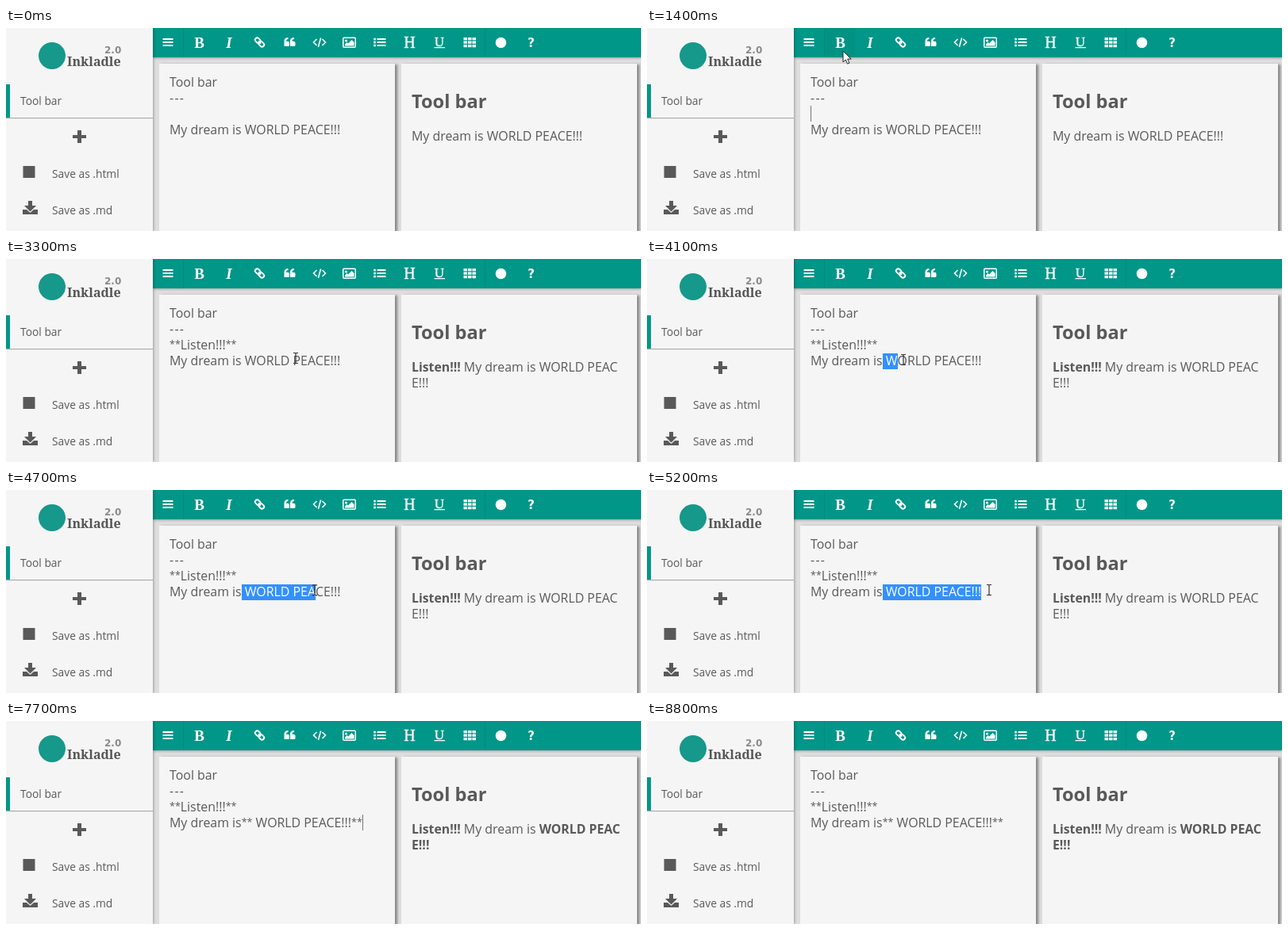
These frames come from a looping animation (800x256 px, 9400 ms). An HTML page:

```html
<!DOCTYPE html>
<html lang="en">
<head>
<meta charset="utf-8">
<title>Markdown editor</title>
<style>
  html, body { margin: 0; width: 100%; height: 100%; overflow: hidden; }
  body { background: #dedede; color: #595959; font: 15.9px/20px "Open Sans", "Noto Sans", sans-serif; }
  #stage { position: relative; width: 800px; height: 256px; overflow: hidden; background: #dedede; }
  #stage > * { position: absolute; }
  svg { left: 0; top: 0; }
  .bar { left: 185px; top: 0; width: 615px; height: 37px; background: #009688; box-shadow: 0 1px 3px rgba(0,0,0,.3); }
  .bar i { position: absolute; top: 0; width: 1px; height: 37px; background: #008a7d; }
  #hover { position: absolute; left: 39px; top: 0; width: 38px; height: 37px; background: #08857a; }
  .side { left: 0; top: 0; width: 185px; height: 256px; background: #f5f5f5; box-shadow: 1px 0 3px rgba(0,0,0,.3); }
  .item { left: 0; top: 71px; width: 180px; height: 42px; border-left: 5px solid #009688; box-shadow: 0 1px 1px rgba(0,0,0,.3); clip-path: inset(0 0 -3px); }
  .panel { top: 45px; width: 297px; height: 230px; background: #f5f5f5; box-shadow: 3px 1px 3px rgba(0,0,0,.4); }
  .small { font-size: 13.8px; white-space: pre; }
  .line { left: 206px; height: 20px; white-space: pre; }
  .line em { font-size: 12.5px; font-style: normal; line-height: 0; vertical-align: 2px; }
  .line u { display: inline-block; height: 20px; margin-top: 1px; line-height: 18px; vertical-align: top; text-decoration: none; background: #3390ff; color: #fff; }
  .line s { display: inline-block; width: 1px; height: 20px; margin-right: -1px; vertical-align: top; background: #777; }
  h2 { left: 511px; top: 77px; margin: 0; font-size: 23.6px; line-height: 30px; font-weight: 700; white-space: pre; }
  #preview { left: 511px; top: 126px; width: 266px; margin: 0; word-break: break-all; }
  #preview b { font-size: 15.8px; font-weight: 700; line-height: 0; }
</style>
</head>
<body>
<div id="stage">
  <div class="bar"><div id="hover"></div><i style="left:38px"></i><i style="left:418px"></i></div>
  <div class="panel" style="left:193px"></div>
  <div class="panel" style="left:498px"></div>
  <div class="side"></div>
  <div class="item"></div>

  <svg width="800" height="256" viewBox="0 0 800 256">
    <circle cx="58" cy="35" r="17" fill="#16988b"/>
    <g font-weight="700">
      <text x="77" y="48" font-family="Noto Serif, serif" font-size="16" font-weight="900" fill="#555">Inkladle</text>
      <text x="124" y="32" font-family="DejaVu Sans, sans-serif" font-size="12" fill="#8a8a8a">2.0</text>
    </g>

    <g fill="#595959">
      <path d="M90 129h5v6h6v4h-6v6h-5v-6h-6v-4h6z"/>
      <rect x="21.5" y="174" width="15" height="15"/>
      <path d="M28 218h5v6h5l-7.500 7.500l-7.500 -7.500h5z"/>
      <path d="M21 229h5l4.500 4l4.500 -4h5v6h-19z"/>
    </g>

    <g fill="#fff">
      <path d="M197.500 13h13v2h-13zM197.500 17h13v2h-13zM197.500 21h13v2h-13z"/>
      <g font-family="Liberation Serif, serif" font-size="19" text-anchor="middle">
        <text x="243.500" y="24.500" font-weight="700">B</text>
        <text x="281" y="24.500" font-weight="700" font-style="italic">I</text>
        <text x="508.500" y="24.500" font-size="20" stroke="#fff" stroke-width=".4">H</text>
        <text x="546" y="22.500" font-size="17" stroke="#fff" stroke-width=".4">U</text>
      </g>
      <path d="M539.500 24h13.500v1.300h-13.500z"/>
      <g transform="translate(319.500 18) rotate(45) scale(.86)" fill="none" stroke="#fff" stroke-width="2.200">
        <rect x="-8" y="-3" width="8.500" height="6" rx="2.800"/>
        <rect x="-.5" y="-3" width="8.500" height="6" rx="2.800"/>
        <path d="M-2.500 0h5"/>
      </g>
      <path id="quote" d="M350.500 23v-6.500q0 -4.500 5 -4.500v2q-2.500 0 -2.500 2.800h2q2 0 2 2v2.700q0 1.500 -1.500 1.500z"/>
      <use href="#quote" x="7.500"/>
      <path d="M391.500 14l-4 4l4 4M398.500 14l4 4l-4 4M396.600 12.500l-3.200 11.500" fill="none" stroke="#fff" stroke-width="1.600"/>
      <rect x="424.750" y="12.250" width="15.500" height="12" rx="1" fill="none" stroke="#fff" stroke-width="1.500"/>
      <circle cx="428.500" cy="16" r="1.600"/>
      <path d="M427 22.500v-2l2.500 -2.500l1.500 1.500l4.500 -4.500l3 3v4.500z"/>
      <path d="M467.500 13h11v2h-11zM467.500 17h11v2h-11zM467.500 21h11v2h-11z"/>
      <path d="M464.500 14h0M464.500 18h0M464.500 22h0" stroke="#fff" stroke-width="3" stroke-linecap="round"/>
      <path d="M576.500 13.700h15.500M576.500 18.200h15.500M576.500 22.700h15.500" stroke="#fff" stroke-width="3.300" stroke-dasharray="4.500 1"/>
      <circle cx="623.500" cy="18.500" r="6.800"/>
      <text x="661.500" y="24" text-anchor="middle" font-family="DejaVu Sans, sans-serif" font-size="15" font-weight="700">?</text>
    </g>
  </svg>

  <div class="small" style="left:18px;top:82px">Tool bar</div>
  <div class="small" style="left:58px;top:174px">Save as .html</div>
  <div class="small" style="left:58px;top:220px">Save as .md</div>

  <div class="line" style="top:58px">Tool bar</div>
  <div class="line" style="top:78px;letter-spacing:1.3px">---</div>
  <div class="line" style="top:98px" id="line3"></div>
  <div class="line" style="top:118px" id="line4"></div>

  <h2>Tool bar</h2>
  <p id="preview"></p>

  <svg width="800" height="256" viewBox="0 0 800 256">
    <path id="arrow" d="M0 0v14l3.300 -3l2.200 5.200l2.400 -1l-2.200 -5.100h4.500z" fill="#fff" stroke="#222" stroke-width="1"/>
    <path id="beam" d="M-3 -6.500h2q1 0 1 1q0 -1 1 -1h2M0 -5.500v11M-3 6.500h2q1 0 1 -1q0 1 1 1h2" fill="none" stroke="#333" stroke-width="1.200"/>
  </svg>
</div>

<script>
const LOOP = 9400, STEP = 100;
const INSERT = 1500, SELECT = 4000, EMBOLDEN = 6300;
const DREAM = "My dream is", PEACE = " WORLD PEACE!!!";
const CARET = [[300, 800], [1300, 2600], [6300, 6900], [7400, 7900], [8300, 8800]];
const POINTER = [[1000, 1600], [3000, 6900]];
const TYPED = [[1500, ""], [1600, "L"], [1700, "Li"], [1800, "List"], [1900, "Liste"], [2000, "Listen"], [2600, "Listen!!!"]];
const HOVER = [[1300, 0], [1400, .25], [1600, 1], [3000, 1], [3300, 0], [6000, 0], [6300, 1], [6900, 1], [7200, 0]];
const PATH = [
  [1000, 330, 225], [1400, 247, 29], [3000, 247, 29], [3300, 365, 125],
  [3900, 297, 127], [4000, 312, 126], [4100, 323, 127], [5000, 422, 126],
  [5200, 431, 126], [5400, 431, 126], [6100, 249, 20]
];

const el = id => document.getElementById(id);
const during = (spans, t) => spans.some(([a, b]) => t >= a && t < b);

// Linear value of one column of a key list at time t
function track(keys, t, col = 1) {
  const next = keys.findIndex(k => k[0] > t);
  if (next < 0) return keys[keys.length - 1][col];
  if (next === 0) return keys[0][col];
  const a = keys[next - 1], b = keys[next];
  return a[col] + (b[col] - a[col]) * (t - a[0]) / (b[0] - a[0]);
}

function setHtml(id, html) {
  const node = el(id);
  if (node.dataset.html !== html) node.innerHTML = node.dataset.html = html;
}

function drawText(t) {
  const caret = during(CARET, t) ? "<s></s>" : "";
  const stars = "<em>**</em>";
  const inserted = t >= INSERT, bold = t >= EMBOLDEN;
  const word = inserted ? TYPED.filter(k => k[0] <= t).pop()[1] : "";
  const here = bold ? "" : caret;
  setHtml("line3", inserted ? stars + word + here + stars : here);

  let tail = PEACE;
  if (bold) {
    tail = stars + PEACE + stars + caret;
  } else if (t >= SELECT) {
    const n = Math.min(PEACE.length, 1 + Math.round((t - SELECT) / 1000 * 13));
    tail = "<u>" + PEACE.slice(0, n) + "</u>" + PEACE.slice(n);
  }
  setHtml("line4", DREAM + tail);

  const lead = !inserted ? "" : word ? `<b>${word}</b> ` : "**** ";
  setHtml("preview", lead + DREAM + (bold ? ` <b>${PEACE.trim()}</b>` : PEACE));
}

function drawPointer(t) {
  const x = track(PATH, t), y = track(PATH, t, 2);
  const shown = during(POINTER, t);
  const inText = x > 193 && x < 490 && y > 45;
  for (const [id, on] of [["arrow", !inText], ["beam", inText]]) {
    el(id).setAttribute("transform", `translate(${x} ${y})`);
    el(id).style.display = shown && on ? "" : "none";
  }
  el("hover").style.opacity = track(HOVER, t);
}

const start = performance.now();
function frame() {
  const t = Math.floor((performance.now() - start) % LOOP / STEP) * STEP;
  drawText(t);
  drawPointer(t);
  requestAnimationFrame(frame);
}
frame();
</script>
</body>
</html>
```
